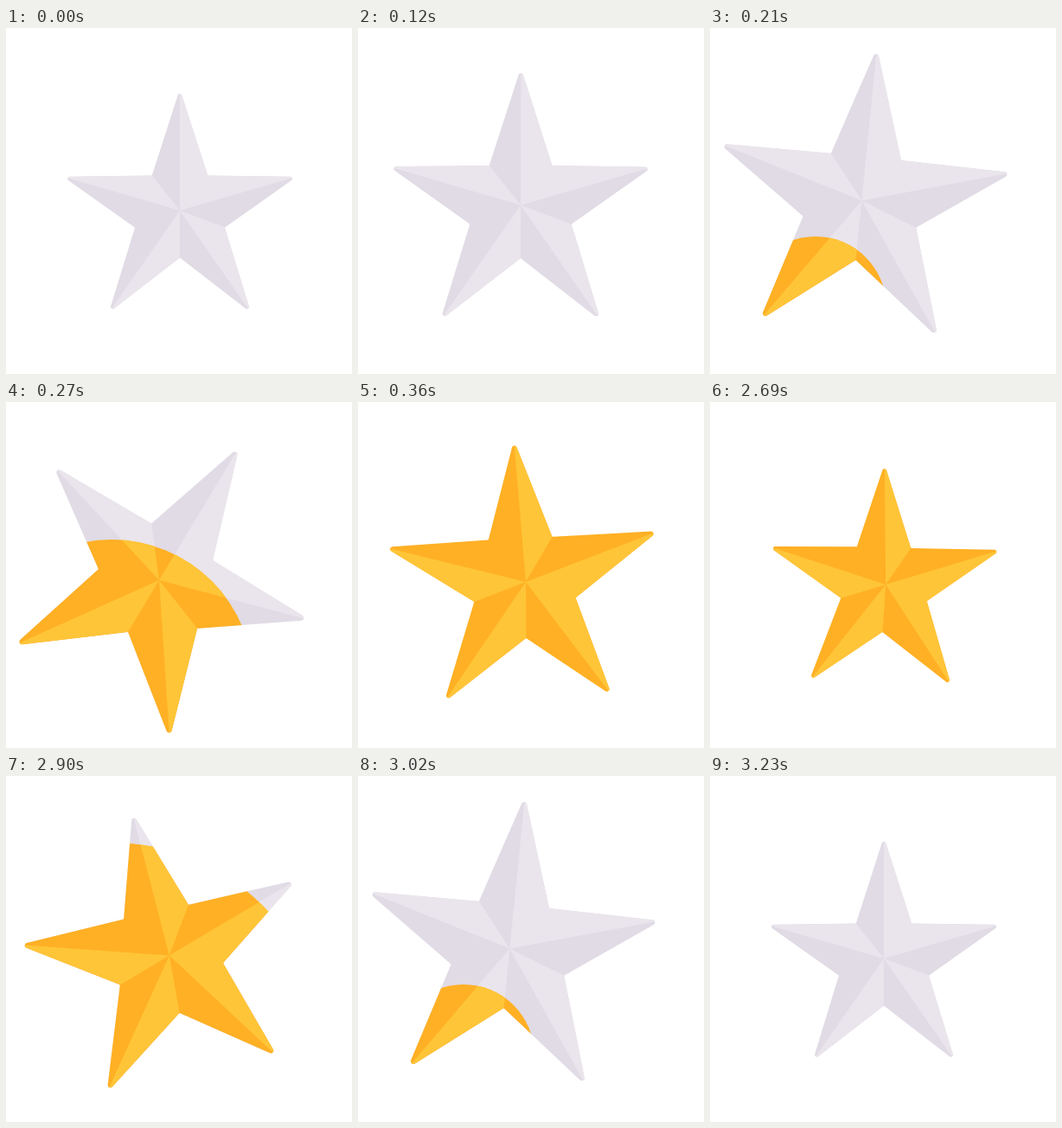
An HTML page with a canvas that plays this animation: 400 px wide and 400 px high, repeating every 8 s.

```html
<!DOCTYPE html>
<html lang="en">
<head>
<meta charset="utf-8">
<title>Star toggle</title>
<style>
  html, body { margin: 0; width: 100%; height: 100%; overflow: hidden; background: #fff; }
  canvas { display: block; width: 400px; height: 400px; }
</style>
</head>
<body>
<canvas id="stage"></canvas>
<script>
const LOOP = 8000, STEP = 30, LAST = 19, OFF_AT = 2690;
const TIP_RADIUS = 2.5;
const GREY = { light: '#eae5ec', dark: '#e0dbe5' };
const GOLD = { light: '#ffc538', dark: '#ffb024' };

// Right half of the star around its hub, from the top tip to the lower notch.
const half = [[0, -135], [32.3, -40.4], [129.8, -37.7], [52, 19.6], [78.9, 113.5], [0, 54.6]];
const mirrored = half.slice(1, -1).reverse().map(([x, y]) => [-x, y]);
const corners = [...half, ...mirrored];
const lightFaces = [0, 1, 3, 5, 8];

// Key poses; the steps between them follow a smooth curve.
const keys = [
  { k: 0, x: 201, y: 211, scale: 1, turn: 0 },
  { k: 7, x: 175.4, y: 199.6, scale: 1.263, turn: 5.7 },
  { k: 9, x: 177, y: 206, scale: 1.28, turn: 31 },
  { k: 12, x: 194, y: 208, scale: 1.17, turn: 69 },
  { k: 16, x: 202.5, y: 210.8, scale: 0.985, turn: 73.5 },
  { k: LAST, x: 203, y: 211, scale: 1, turn: 73 }
];

// The gold fill spreads as a circle from a fixed point.
const fill = { x: 122, y: 323, start: 5, full: 12, speed: 41 };

function slope(i, name) {
  const before = keys[i - 1], after = keys[i + 1];
  return before && after ? (after[name] - before[name]) / (after.k - before.k) : 0;
}

// Cubic Hermite curve through the key poses.
function value(name, k) {
  const i = Math.max(0, keys.findIndex(key => key.k >= k) - 1);
  const from = keys[i], to = keys[i + 1], span = to.k - from.k;
  const u = (k - from.k) / span, v = 1 - u;
  return from[name] * v * v * (1 + 2 * u) + to[name] * u * u * (3 - 2 * u)
    + span * u * v * (slope(i, name) * v - slope(i + 1, name) * u);
}

// Tips reach further out so that their rounded ends keep the right length.
const points = corners.map(([x, y], i) => {
  const grow = i % 2 ? 1 : 1 + TIP_RADIUS * 2.24 / Math.hypot(x, y);
  return [x * grow, y * grow];
});
const at = i => points[(i + 10) % 10];

const outline = new Path2D();
const [a, b] = [at(9), at(0)];
outline.moveTo((a[0] + b[0]) / 2, (a[1] + b[1]) / 2);
points.forEach((p, i) => outline.arcTo(...p, ...at(i + 1), i % 2 ? 1 : TIP_RADIUS));
outline.closePath();

const facets = new Path2D();
for (const i of lightFaces) {
  facets.moveTo(0, 0);
  facets.lineTo(...at(i));
  facets.lineTo(...at(i + 1));
  facets.closePath();
}

const canvas = document.getElementById('stage');
const ctx = canvas.getContext('2d');
const ratio = window.devicePixelRatio || 1;
canvas.width = canvas.height = 400 * ratio;

function drawStar(k, tone) {
  const scale = value('scale', k);
  ctx.save();
  ctx.translate(value('x', k), value('y', k));
  ctx.rotate(value('turn', k) * Math.PI / 180);
  ctx.scale(scale, scale);
  ctx.clip(outline);
  ctx.fillStyle = tone.dark;
  ctx.fillRect(-200, -200, 400, 400);
  ctx.fillStyle = tone.light;
  ctx.fill(facets);
  ctx.restore();
}

function stepAt(t) {
  return t < OFF_AT
    ? Math.min(LAST, Math.floor(t / STEP))
    : Math.max(0, LAST - 1 - Math.floor((t - OFF_AT) / STEP));
}

function draw(t) {
  const k = stepAt(t);
  ctx.setTransform(ratio, 0, 0, ratio, 0, 0);
  ctx.fillStyle = '#fff';
  ctx.fillRect(0, 0, 400, 400);
  if (k >= fill.full) return drawStar(k, GOLD);
  drawStar(k, GREY);
  if (k <= fill.start) return;
  ctx.save();
  ctx.beginPath();
  ctx.arc(fill.x, fill.y, (k - fill.start) * fill.speed, 0, 2 * Math.PI);
  ctx.clip();
  drawStar(k, GOLD);
  ctx.restore();
}

const begin = performance.now();
function tick() {
  draw((performance.now() - begin) % LOOP);
  requestAnimationFrame(tick);
}
tick();
</script>
</body>
</html>
```
